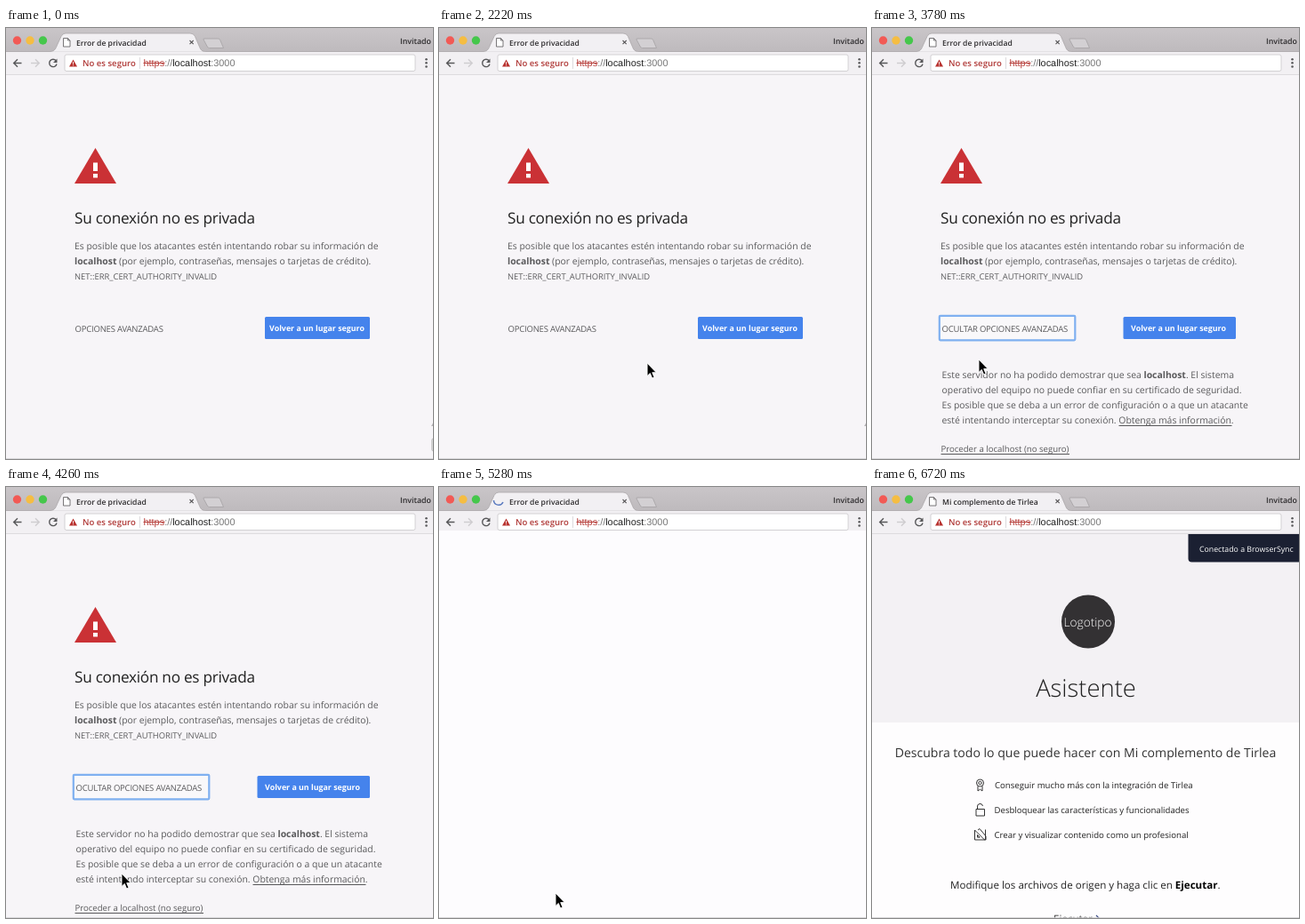
These frames come from a looping animation (480x485 px, 7.68 s). An HTML page:

```html
<!DOCTYPE html>
<html lang="es">
<head>
<meta charset="utf-8">
<title>Error de privacidad</title>
<style>
html, body { margin: 0; width: 100%; height: 100%; overflow: hidden; background: #f7f5f8; }
svg { display: block; width: 100%; height: 100%; font-family: "Open Sans", "Noto Sans", sans-serif; text-rendering: geometricPrecision; }
.bold { font-weight: 700; }
.semi { font-weight: 600; }
.light { font-weight: 300; }
.mid { text-anchor: middle; }
.body { font-size: 10.42px; fill: #5a5a5c; }
.caps { font-size: 9.5px; letter-spacing: -.2px; fill: #5a5a5c; }
.url { font-family: "Liberation Sans", Arial, sans-serif; font-size: 10.9px; }
.item { font-size: 9.6px; fill: #222; }
.line { fill: none; stroke: #58585a; stroke-width: 1; }
.icon { fill: none; stroke: #333; stroke-width: 1; }
.tool { fill: none; stroke: #58585a; stroke-width: 1.4; }
</style>
</head>
<body>
<svg viewBox="0 0 480 485" preserveAspectRatio="none">
  <defs>
    <linearGradient id="bar" x2="0" y2="1">
      <stop stop-color="#c9c5c8"/><stop offset="1" stop-color="#bebabd"/>
    </linearGradient>
  </defs>
  <rect width="480" height="485" fill="#f7f5f8"/>

  <g id="warning">
    <path d="M100.5 135L124 175H77z" fill="#ca3135"/>
    <path d="M98 151.5h5v9.5h-5zM98 164h5v4.500h-5z" fill="#fff"/>
    <text x="77" y="220" font-size="17.2" letter-spacing="-.27" fill="#222">Su conexión no es privada</text>
    <g class="body">
      <text x="77" y="249">Es posible que los atacantes estén intentando robar su información de</text>
      <text x="77" y="266"><tspan class="bold">localhost</tspan> (por ejemplo, contraseñas, mensajes o tarjetas de crédito).</text>
      <text x="77" y="283" font-size="9.4" style="font-size:9.4px">NET::ERR_CERT_AUTHORITY_INVALID</text>
    </g>
    <g id="closed">
      <text class="caps" x="77.500" y="342">OPCIONES AVANZADAS</text>
      <path id="line1" class="line" d="M77.500 344.500H179"/>
      <rect x="291" y="325" width="118" height="25" rx="1.500" fill="#4583ec"/>
      <text class="bold mid" x="349.500" y="341" font-size="8.85" fill="#fff">Volver a un lugar seguro</text>
      <path d="M480 444.500l-2 3.500h2z" fill="#b5b3b6"/>
      <rect id="edge" x="478.800" y="462" width="4" height="14" rx="1.500" fill="#ddd" stroke="#aaa" stroke-width=".7"/>
    </g>
    <g id="opened">
      <rect x="75.800" y="323.800" width="152.500" height="27.500" rx="1" fill="#f9f8fa" stroke="#7fb0f0" stroke-width="2.200"/>
      <text class="caps" x="78.500" y="342">OCULTAR OPCIONES AVANZADAS</text>
      <path id="line2" class="line" d="M78.500 344.500H222"/>
      <rect x="282.500" y="325" width="126.500" height="25" rx="1.500" fill="#4583ec"/>
      <text class="bold mid" x="344.500" y="341" font-size="8.85" fill="#fff">Volver a un lugar seguro</text>
      <g class="body">
        <text x="78.500" y="394">Este servidor no ha podido demostrar que sea <tspan class="bold">localhost</tspan>. El sistema</text>
        <text x="78.500" y="411">operativo del equipo no puede confiar en su certificado de seguridad.</text>
        <text x="78.500" y="428">Es posible que se deba a un error de configuración o a que un atacante</text>
        <text x="78.500" y="445">esté intentando interceptar su conexión. Obtenga más información.</text>
        <text x="77.500" y="477" style="font-size:9.6px">Proceder a localhost (no seguro)</text>
      </g>
      <path class="line" d="M277.500 447.500H404.500M77.500 479.500H222"/>
    </g>
  </g>

  <g id="addin">
    <rect y="52" width="480" height="213" fill="#f3f1f4"/>
    <rect y="265" width="480" height="220" fill="#fefdfe"/>
    <path d="M355.500 53H480V84.500H359.500a4 4 0 0 1-4-4z" fill="#1b2032"/>
    <text x="368" y="72.500" font-size="8.75" fill="#fff">Conectado a BrowserSync</text>
    <circle cx="243" cy="151.500" r="30" fill="#333133"/>
    <text class="light mid" x="242.500" y="157" font-size="13.7" fill="#fff">Logotipo</text>
    <text class="light mid" x="240.500" y="236" font-size="27.4" fill="#222">Asistente</text>
    <text class="mid" x="240" y="304" font-size="14.05" fill="#333">Descubra todo lo que puede hacer con Mi complemento de Tirlea</text>
    <g class="item">
      <text x="138" y="339">Conseguir mucho más con la integración de Tirlea</text>
      <text x="137.500" y="367">Desbloquear las características y funcionalidades</text>
      <text x="137.500" y="395">Crear y visualizar contenido como un profesional</text>
    </g>
    <g class="icon">
      <circle cx="121.500" cy="333" r="4"/><circle cx="121.500" cy="333" r="1.700"/>
      <path d="M119 336.500V342l2.500-1.800 2.500 1.800V336.500"/>
      <path d="M117 362.500h9.500v7.500h-9.500zM118.500 362.500v-2.500a3 3 0 0 1 6-1"/>
      <path d="M115.500 386v11h11zM118.500 391.500v2.700h2.700zM119 386l2-1.500 7 8.500v4h-2M127.500 385.500v11.500"/>
    </g>
    <text x="88" y="452" font-size="11.57" fill="#222">Modifique los archivos de origen y haga clic en <tspan class="bold" fill="#000">Ejecutar</tspan>.</text>
    <text x="204" y="490" font-size="11.6" fill="#333">Ejecutar</text>
    <path d="M252 482l4 4-4 4" fill="none" stroke="#3b4a86" stroke-width="1.200"/>
  </g>

  <g id="browser">
    <rect width="480" height="27" fill="url(#bar)"/>
    <rect y="26.500" width="480" height="26" fill="#f2f0f3"/>
    <path d="M0 52.500H480" stroke="#dddbde"/>
    <path d="M0 26.500H50C55 26 56 23 58 18L62 9.500Q63.500 6 67 6H207Q211 6 212.500 9.500L217 20C219 25 220 26.500 225 26.500H480" fill="#f2f0f3" stroke="#aaa6a9" stroke-width=".8"/>
    <path d="M223 12H238.500Q240 12 240.700 13.500L244.500 22.500H228.500Q227 22.500 226.300 21L222 13Q221.500 12 223 12z" fill="#d3d0d3" stroke="#a5a1a4" stroke-width=".8"/>
    <circle cx="12.500" cy="14" r="4.700" fill="#f25a55"/>
    <circle cx="27" cy="14" r="4.700" fill="#f5bd42"/>
    <circle cx="41.500" cy="14" r="4.700" fill="#45c74b"/>
    <path id="favicon" d="M64.500 11.500h5l2.500 2.500v7h-7.500zM69.500 11.500v2.500h2.500" fill="#fff" stroke="#6a686a" stroke-width=".9"/>
    <path id="spinner" d="M61.500 15a5.500 5.500 0 0 0 10.500 2" fill="none" stroke="#5878be" stroke-width="1.500"/>
    <text id="title" class="semi" x="79" y="19.500" font-size="8.55" fill="#2c2a2c"></text>
    <path d="M206.500 14l4.200 4.200M210.700 14l-4.200 4.200" stroke="#5a585a" stroke-width="1.100"/>
    <text class="semi" x="443" y="17.500" font-size="8.8" fill="#2c2a2c">Invitado</text>
    <path class="tool" d="M17.500 39.500H9M13 35.200L8.700 39.500 13 43.800"/>
    <path class="tool" d="M28 39.500h8.500M33 35.200l4.300 4.300L33 43.800" style="stroke:#cfcdd0"/>
    <path class="tool" d="M56.200 36.800A4.200 4.200 0 1 0 57 40.500"/>
    <path d="M57.500 34.500v4.500h-4.500z" fill="#58585a"/>
    <rect x="66" y="30" width="394" height="18.500" rx="2" fill="#fff" stroke="#d2d0d3"/>
    <path d="M75.500 35.500L80 43.500H71z" fill="#b8322f"/>
    <path d="M75.500 38v2.800M75.500 41.500v1" stroke="#fff" stroke-width=".9"/>
    <text class="semi" x="86" y="43" font-size="9.57" fill="#b03a38">No es seguro</text>
    <path d="M150.500 33v13" stroke="#dcdadd"/>
    <text class="url" x="154.500" y="43" fill="#777"><tspan fill="#b8423e">https</tspan>://<tspan fill="#222">localhost</tspan>:3000</text>
    <path d="M154.500 39.500H178.500" stroke="#b8423e"/>
    <g fill="#58585a">
      <circle cx="472.500" cy="35.200" r="1.250"/><circle cx="472.500" cy="39.300" r="1.250"/><circle cx="472.500" cy="43.400" r="1.250"/>
    </g>
  </g>
  <rect id="blank" y="49" width="480" height="436" fill="#fdfcfe"/>
  <path d="M0 484.600H480" stroke="#d0ced1" stroke-width=".8"/>

  <circle id="ring" r="22" fill="none" stroke="#151515" stroke-width="1.300"/>
  <g id="mouse">
    <path id="arrow" d="M0 0V14.500L3.300 11.400 5.600 17 8 16 5.700 10.600H10.200z" fill="#000" stroke="#fff" stroke-width=".9"/>
    <path id="hand" d="M-1.200 .8Q0-.8 1.200 .8V5Q2.500 4 3.300 5.300 4.600 4.700 5.200 6 6.600 5.800 6.600 7.500V9.500L5.300 13H-.8L-4 8.500Q-4.300 6.700-2.500 7.300L-1.200 8.500z" fill="#fff" stroke="#222" stroke-width=".9"/>
  </g>
</svg>
<script>
const LOOP = 7680, STEP = 60;
const ui = {};
document.querySelectorAll('[id]').forEach(el => ui[el.id] = el);

const show = (name, on) => ui[name].style.display = on ? '' : 'none';
const place = (name, x, y) => ui[name].setAttribute('transform', `translate(${x} ${y})`);

// Pointer waypoints: time, x, y
const path = [
  [1740, 455, 451], [2460, 141, 346], [2580, 119.5, 336.500],
  [3480, 119.5, 336.500], [3780, 120, 373], [4260, 130, 435], [4620, 132, 471],
  [4920, 132, 471], [5280, 131, 457], [5520, 139, 394],
  [6480, 139, 394], [6660, 213, 472]
];

function pointer(t) {
  let i = 0;
  while (i < path.length - 2 && t >= path[i + 1][0]) i++;
  const [t0, x0, y0] = path[i], [t1, x1, y1] = path[i + 1];
  const p = Math.min(1, Math.max(0, (t - t0) / (t1 - t0)));
  const e = (p + p * p * (3 - 2 * p)) / 2;
  return [x0 + (x1 - x0) * e, y0 + (y1 - y0) * e];
}

function draw(now) {
  const t = Math.floor(now % LOOP / STEP) * STEP;
  const within = (a, b) => t >= a && t < b;
  const [x, y] = pointer(t);
  const loaded = t >= 5460;
  const overToggle = within(2520, 4860) && y < 350;
  const overProceed = within(4260, 4860) && y > 465;
  const hand = overToggle || overProceed;

  show('warning', !loaded);
  show('closed', t < 3120);
  show('opened', t >= 3120);
  show('edge', t < 1740);
  show('line1', overToggle);
  show('line2', overToggle);
  show('blank', within(5100, 5460));
  show('addin', loaded);

  const loading = within(4920, 5460);
  show('spinner', loading);
  show('favicon', !loading);
  ui.spinner.setAttribute('transform', `rotate(${(t - 5280) * .45} 67 16)`);
  ui.title.textContent = loaded ? 'Mi complemento de Tirlea' : 'Error de privacidad';

  show('mouse', within(1740, 4860) || within(4920, 6720));
  show('arrow', !hand);
  show('hand', hand);
  place('mouse', x, y);
  show('ring', within(2940, 3120) || within(4680, 4860));
  place('ring', x + 1, y + 3.5);
}

const start = performance.now();
function tick() {
  draw(performance.now() - start);
  requestAnimationFrame(tick);
}
tick();
</script>
</body>
</html>
```
